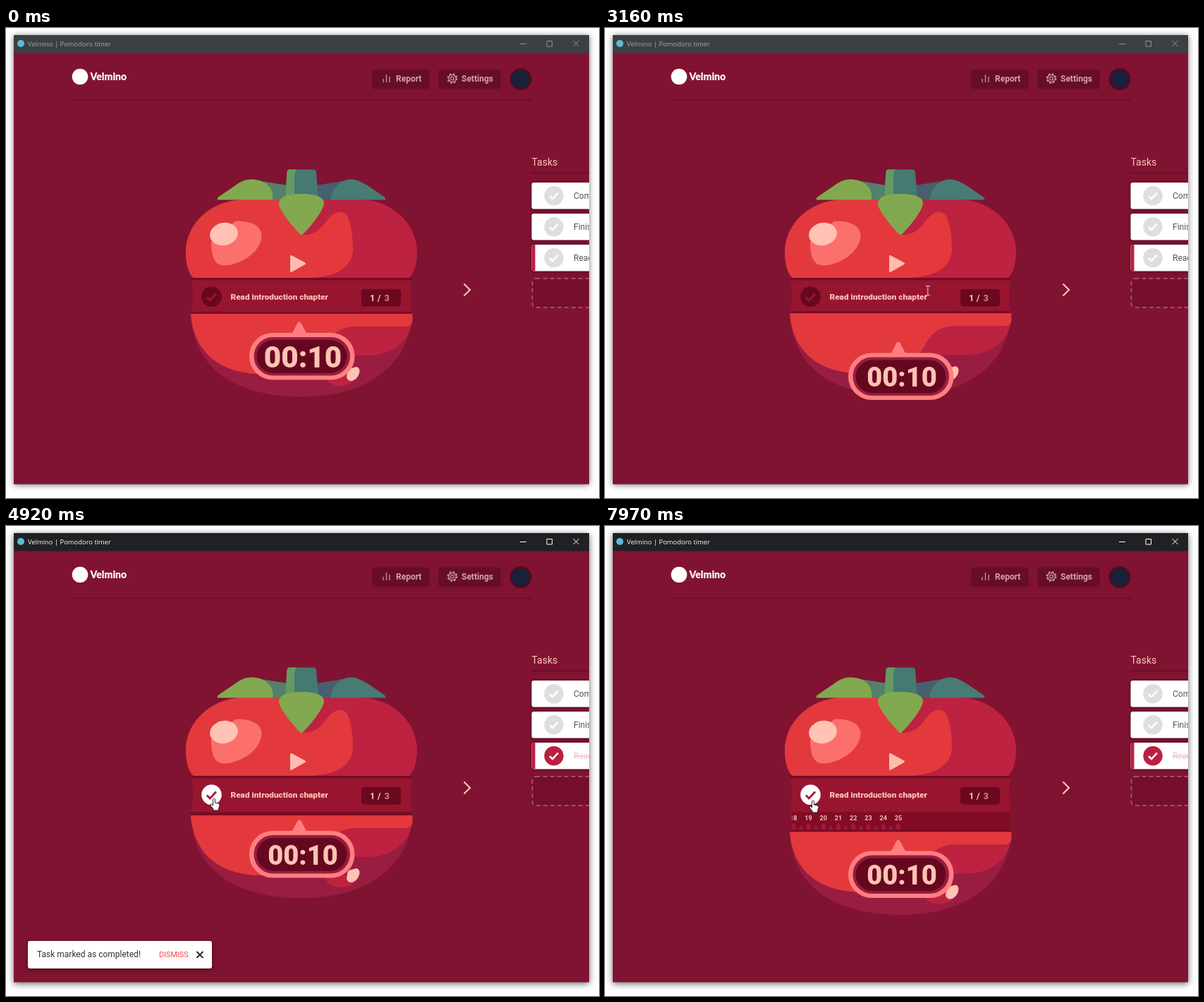
An HTML page that plays this animation: 841 by 666 pixels, repeating every 8000 ms.

```html
<!DOCTYPE html>
<html lang="en">
<head>
<meta charset="utf-8">
<title>Pomodoro timer</title>
<style>
  html, body { margin: 0; width: 100%; height: 100%; overflow: hidden; background: #fff; }
  svg { display: block; width: 100vw; height: 100vh; font-family: Roboto, sans-serif; }
  #frame { filter: drop-shadow(0 1px 4px #0008); }
  .focused #frame { filter: drop-shadow(0 2px 5px #0009); }
  #bar { fill: #3b4043; }
  .focused #bar { fill: #202124; }
  #caption { font: 9.4px "Open Sans", sans-serif; fill: #9fa9ad; }
  .focused #caption { fill: #fff; }
  #controls { fill: none; stroke: #8f9496; }
  .focused #controls { stroke: #fff; }
  .button { fill: #670d27; }
  .label { font-size: 12px; font-weight: 700; fill: #d3a3aa; }
  .icon { fill: none; stroke: #c795a0; stroke-width: 1.3; }
  .tick { fill: none; stroke-width: 2.6; }
  .row { fill: #fff; filter: drop-shadow(0 1px 2px #0006); }
  .task { font-size: 12px; fill: #555; }
  .done .task { fill: #eebfc3; text-decoration: line-through; }
  .done .dot { fill: #bb1f40; }
  .cream { fill: #ffc2b4; }
  #toast { filter: drop-shadow(0 2px 3px #0007); }
  #scale text { font-size: 9px; font-weight: 700; fill: #f5bdb0; text-anchor: middle; }
  #scale rect { fill: #9f1836; }
  #time { font-size: 38px; font-weight: 900; text-anchor: middle; }
</style>
</head>
<body>
<svg id="app" viewBox="0 0 841 666" preserveAspectRatio="none">
  <defs>
    <clipPath id="window"><rect x="11" y="10" width="816" height="636.5"/></clipPath>
    <clipPath id="slot"><rect x="265" y="400" width="310.500" height="40"/></clipPath>
    <path id="check" class="tick" d="M-6 .5-2 4.500 6-4"/>
  </defs>

  <rect id="frame" x="11" y="10" width="816" height="636.5" fill="#801331"/>
  <g clip-path="url(#window)">
    <rect id="bar" x="11" y="10" width="816" height="25.500"/>
    <circle cx="21" cy="22" r="5" fill="#61b9d3"/>
    <text id="caption" x="31" y="26">Velmino | Pomodoro timer</text>
    <path id="controls" d="M729 22.500h9M767 18.500h7.500v7.500h-7.500zM804.500 18l8 8m0-8-8 8"/>

    <circle cx="105" cy="69" r="11.3" fill="#fff"/>
    <text x="119.500" y="74" fill="#fff" style="font:900 14px Lato,sans-serif">Velmino</text>
    <rect class="button" x="519.500" y="58.500" width="81" height="28" rx="4"/>
    <rect class="button" x="613.500" y="58.500" width="88" height="28" rx="4"/>
    <path class="icon" d="M535 77v-5M539.500 77V66M544 77v-8"/>
    <g class="icon">
      <circle cx="633" cy="71.500" r="2.300"/>
      <circle cx="633" cy="71.500" r="5.200"/>
      <circle cx="633" cy="71.500" r="6.500" stroke-width="1.800" stroke-dasharray="2.600 2.505"/>
    </g>
    <text class="label" x="553" y="76">Report</text>
    <text class="label" x="646" y="76">Settings</text>
    <circle cx="730" cy="72.500" r="14" fill="#18203a" stroke="#500a22" stroke-width="3"/>
    <path d="M93 102.500h653M745 205.500h82" stroke="#690e28" stroke-width="2"/>

    <text x="745.500" y="194.500" font-size="14" fill="#ffc5b6">Tasks</text>
    <g id="tasks"></g>
    <rect x="746.500" y="355" width="110" height="41" rx="5" fill="#750f2b" stroke="#ad6276" stroke-width="1.500" stroke-dasharray="6 4"/>
    <path d="m649.500 362.500 8.500 8.500-8.500 8.500" fill="none" stroke="#ffc5b6" stroke-width="2.200"/>

    <!-- upper half of the tomato -->
    <path fill="#be2241" d="M266 354C260 350 255 336 255 318C255 278 290 243 340 243H500C548 243 583 278 583 318C583 336 577 350 572 354Z"/>
    <path fill="#e3393d" d="M266 354C260 350 255 336 255 318C255 278 290 243 340 243H419V293C440 294 447 283 455 273C463 262 474 257 482 264C489 272 492 297 492 313C492 341 465 353 430 354Z"/>
    <path fill="#fb706c" d="M291 303C291 322 295 337 310 336.500C333 336 363 317 362.500 293C361 277 341 273 325 274Z"/>
    <ellipse class="cream" cx="309" cy="292" rx="20" ry="16" transform="rotate(-12 309 292)"/>
    <path fill="#52806c" d="M346 214.500 400 223V243.500H378Z"/>
    <path fill="#82a950" d="M300 243.500Q299 241 302 239L324 224C333 217 341 214 349 214.500C367 215 381 226 378 243.500Z"/>
    <path fill="#475f6e" d="M440 223 492 214.500 460 243.500H440Z"/>
    <path fill="#487b73" d="M460 243.500C463 224 477 214 490 214.500C500 215 507 220 514 224L536 239Q539 241 538 243.500Z"/>
    <path fill="#457971" d="M402 200.500H436Q439.500 200.500 440 204L443 243H396L398.500 204Q399 200.500 402 200.500Z"/>
    <path fill="#679a62" d="M402 200.500H412Q409 204 409 212V243H396L398.500 204Q399 200.500 402 200.500Z"/>
    <path fill="#82a950" d="M387 249C387 240 398 235 419 235C440 235 451 240 451 248C451 258 431 283 421 292Q419 294.500 417 292C407 282 387 258 387 249Z"/>
    <path d="M404.500 323.500 423.500 333.800 404.500 344.500Z" stroke="#ffbcae" stroke-width="3" stroke-linejoin="round" fill="#ffbcae"/>

    <!-- dial behind the task band -->
    <path d="M263 354H575.500Q572 378 575.500 405H263Q267 378 263 354Z" fill="#98152f"/>
    <path d="M263 354H575.500V357.500H263Z" fill="#760b25"/>
    <rect id="slotBack" x="265" y="405" width="310.500" fill="#820c24"/>
    <g clip-path="url(#slot)"><g id="scale"></g></g>

    <g id="lower">
      <path d="M262.500 402H575.500V405.500H262.500Z" fill="#760b25"/>
      <path fill="#991d41" d="M262 405C265 480 322 522.500 420 522.500C515 522.500 573 475 576 405Z"/>
      <path fill="#be2241" d="M576 405V418C569 447 545 464 512 464H440L452 423H566Z"/>
      <path fill="#e3393d" d="M262 405H576.500V413C576.500 420 572 423 565 423H497C477 423 465 431 456 446L430 490H354C306 487 267 463 262 405Z"/>
      <path fill="#be2241" d="M455 490V499C464 511 487 509 497 497V490Z"/>
      <path class="cream" d="M484 488Q484 483 490 482L497 480Q503 482 501 489Q499 497 491 500Q485 501 483 495Z"/>
    </g>
    <g id="timer">
      <path fill="#ff7f80" d="M404 436 413.500 418Q416 414.500 418.500 418L428 436Z"/>
      <rect x="345" y="432" width="149.500" height="66.500" rx="33" fill="#ff7f80"/>
      <rect x="351.500" y="438" width="136.500" height="54.500" rx="27" fill="#981c40"/>
      <rect x="355.500" y="442" width="128" height="47" rx="23.500" fill="#65081f"/>
      <text id="time" class="cream" y="13.500">00:10</text>
    </g>

    <circle id="doneDot" cx="291.500" cy="380.800" r="14.300"/>
    <use id="doneTick" href="#check" transform="translate(291.500 381) scale(1.100)"/>
    <text x="318.500" y="385" font-size="11.800" font-weight="900" class="cream">Read introduction chapter</text>
    <rect x="504" y="370" width="56" height="24.500" rx="4" fill="#69081f"/>
    <text x="516" y="386.500" font-size="13" font-weight="700" class="cream">1 / <tspan x="536.500" fill="#d5857a">3</tspan></text>

    <g id="toast">
      <rect x="31" y="588" width="261" height="39" rx="3" fill="#fff"/>
      <text x="44" y="611" font-size="12" fill="#333">Task marked as completed!</text>
      <text x="217" y="611" font-size="10.800" fill="#f04a4c">DISMISS</text>
      <path d="m270.500 603 9 9m0-9-9 9" stroke="#222" stroke-width="1.800"/>
    </g>
  </g>

  <g id="cursor" stroke-linejoin="round">
    <path id="arrow" fill="#fff" stroke="#222" d="M0 0V14L3.500 11 6 16.500 8 15.500 5.500 10.500H10Z"/>
    <path id="hand" fill="#fff" stroke="#222" d="M-1.500 1Q0-1.500 1.500 1V6L6 7Q8.500 7.500 8 10L6.500 14.500V17H-1V15L-5 10Q-5.500 7.500-3 8.500L-1.500 10Z"/>
    <path id="beam" fill="none" stroke="#ddd" d="M-3-6.500h2.500l.5.500.5-.5H3M0-6V6M-3 6.500h2.500l.5-.5.5.5H3"/>
  </g>
</svg>
<script>
const $ = id => document.getElementById(id);
const LOOP = 8000, CLICK = 4700, STEP = 21.25;
const visits = [[3140, CLICK], [6940, LOOP]];   // when the dial is open

// Cursor stops: time, x, y
const path = [[1680, 808, 668], [1950, 783, 633], [2760, 746, 592], [3160, 458, 372],
  [3600, 400, 384], [3950, 295, 386], [5800, 295, 386], [6500, 780, 392],
  [6640, 766, 392], [7130, 334, 389], [7400, 295, 389], [8000, 295, 389]];

$("tasks").innerHTML = ["Complete the report", "Finish homework", "Read introduction chapter"].map((name, i) =>
  `<g id="task${i}" transform="translate(745 ${219 + 44 * i})">
    <rect class="row" x=".5" width="120" height="37.500" rx="3"/>
    ${i == 2 ? '<path d="M5.500 0H3Q.5 0 .5 3V34.500Q.5 37.500 3 37.500H5.500Z" fill="#bd2042"/>' : ""}
    <circle class="dot" cx="32" cy="18.700" r="13.700" fill="#dedede"/>
    <use href="#check" x="32" y="18.700" stroke="#fff"/>
    <text class="task" x="60" y="23">${name}</text></g>`).join("");

const minutes = [...Array(26).keys()].filter(n => n != 10);
$("scale").innerHTML = minutes.map((n, i) => {
  const x = i * STEP;
  const half = i < minutes.length - 1 ? `<rect x="${x + STEP / 2 - 2.5}" y="425.500" width="5" height="12" rx="2.500"/>` : "";
  return `<text x="${x}" y="417">${n}</text><rect x="${x - 3}" y="421.500" width="6" height="16" rx="3"/>${half}`;
}).join("");

const clamp = (v, a = 0, b = 1) => Math.min(b, Math.max(a, v));
const mix = (a, b, k) => a + (b - a) * k;
const smooth = k => k * k * (3 - 2 * k);

// Standard CSS "ease": cubic-bezier(.25, .1, .25, 1)
function ease(x) {
  let lo = 0, hi = 1, s;
  const bez = (a, b) => 3 * a * s * (1 - s) ** 2 + 3 * b * s * s * (1 - s) + s ** 3;
  for (let i = 0; i < 20; i++) {
    s = (lo + hi) / 2;
    if (bez(.25, .25) < x) lo = s; else hi = s;
  }
  return bez(.1, 1);
}

function cursorAt(t) {
  const i = path.findIndex(p => p[0] > t);
  if (i < 1) return null;
  const [a, b] = [path[i - 1], path[i]], k = (t - a[0]) / (b[0] - a[0]);
  return [mix(a[1], b[1], k), mix(a[2], b[2], k)];
}

function lowerOffset(t, start, end) {
  if (t >= end) return mix(28.5, 0, smooth(clamp((t - end) / 300)));
  const age = t - start;
  return age < 160 ? mix(-2, 26, smooth(age / 160)) : mix(26, 28.5, smooth(clamp((age - 160) / 200)));
}

function pulse(t) {
  const wave = t < 3140 ? Math.cos(Math.PI * t / 1000)
    : t > 5800 && t < 6940 ? -Math.cos(Math.PI * (t - 5800) / 1000) : -1;
  return 1 + .055 * (1 + wave);
}

function draw(now) {
  const t = now % LOOP, done = t >= CLICK;
  const visit = visits.findLast(v => t >= v[0]);
  const open = visit && t < visit[1];
  const offset = visit ? lowerOffset(t, ...visit) : 0;

  $("app").classList.toggle("focused", done);
  $("task2").classList.toggle("done", done);
  $("doneDot").setAttribute("fill", done ? "#fff" : "#68081f");
  $("doneTick").setAttribute("stroke", done ? "#a5183a" : "#98152f");

  $("lower").setAttribute("transform", `translate(0 ${offset})`);
  $("timer").setAttribute("transform", `translate(0 ${open ? 28.5 : 0})`);
  $("time").setAttribute("transform", `translate(421 466) scale(${pulse(t)})`);
  $("slotBack").setAttribute("height", Math.max(0, offset));
  $("scale").style.display = offset > 0 ? "" : "none";
  if (visit) {
    const zero = mix(416, -100, ease(clamp((t - visit[0]) / 1200)));
    $("scale").setAttribute("transform", `translate(${zero} 0)`);
  }

  $("toast").style.opacity = clamp((t - CLICK) / 200) * clamp((7700 - t) / 200);

  const at = cursorAt(t);
  $("cursor").style.display = at ? "" : "none";
  if (at) {
    const [x, y] = at, inBand = y > 365 && y < 396;
    const shape = inBand && x < 308 ? "hand" : inBand && x > 316 && x < 475 ? "beam" : "arrow";
    for (const id of ["hand", "beam", "arrow"]) $(id).style.display = id == shape ? "" : "none";
    $("cursor").setAttribute("transform", `translate(${x} ${y})`);
  }
}

const begin = performance.now();
(function tick() {
  draw(performance.now() - begin);
  requestAnimationFrame(tick);
})();
</script>
</body>
</html>
```
